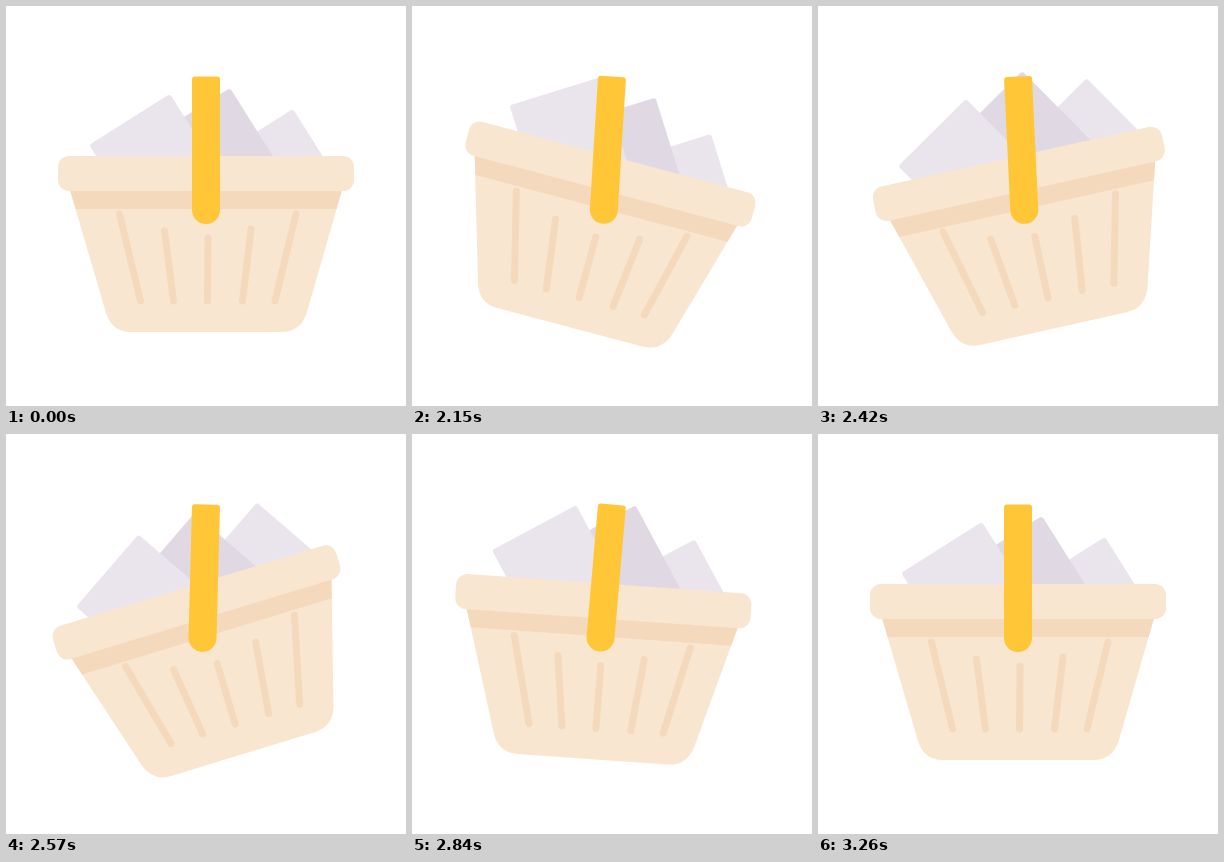
Recreate the animation shown at these times as an HTML page. Size 400 by 400 pixels, loop 3290 ms.

```html
<!DOCTYPE html>
<html lang="en">
<head>
<meta charset="utf-8">
<title>Swinging basket</title>
<style>
  html, body { margin: 0; width: 100%; height: 100%; overflow: hidden; background: #fff; }
  svg { display: block; width: 100%; height: 100%; }
</style>
</head>
<body>
<svg viewBox="0 0 400 400">
  <g id="basket">
    <g id="papers"></g>
    <path d="M64 184H336L301 306Q295 326 275 326H125Q106 326 100 307Z" fill="#f8e6d0"/>
    <path d="M64 184H336L330.6 203H69.7Z" fill="#f5d9bc"/>
    <path d="M113.5 208 134.5 295M158.5 225 167.5 295M202 232 201.5 295M245 223 236.5 295M290 208 269 295"
          stroke="#f5d9bc" stroke-width="7" stroke-linecap="round"/>
    <rect x="52" y="150" width="296" height="35" rx="11" fill="#f8e6d0"/>
  </g>
  <path id="handle" d="M186 73.5Q186 70.5 189 70.5H211Q214 70.5 214 73.5V204A14 14 0 0 1 186 204Z" fill="#ffc738"/>
</svg>
<script>
  const LOOP = 3290, REST = 2000, STEP = 30, BEAT = 8.3;
  const TOP = 71, PIVOT = 189.5;
  const byId = id => document.getElementById(id);

  // Turning points as [step, degrees]; the basket turns on an even beat, the handle leads it.
  const swing = [0, 22.8, -23.3, 8, -4.6, 0].map((angle, i) => [i * BEAT, angle]);
  const tilt = [[0, 0], [8.2, 5.3], [14, -2.7], [25.2, 7.3], [33, -0.7], [40.5, 0]];

  // Each paper hops twice: first step, length of a hop, and the two heights.
  const papers = [
    { x: 287, y: 103, height: 80, fill: '#eae5ed', delay: 8.2, hop: 16.4, lifts: [17.5, 10], drift: 0 },
    { x: 224, y: 82, height: 110, fill: '#e0d9e4', delay: 6.2, hop: 13.4, lifts: [15, 14.5], drift: 0.12 },
    { x: 164, y: 88, height: 90, fill: '#eae5ed', delay: 0, hop: 17, lifts: [18.5, 18], drift: 0.15 }
  ];

  for (const paper of papers) {
    paper.node = document.createElementNS('http://www.w3.org/2000/svg', 'rect');
    const attributes = { x: -95.5, width: 95.5, height: paper.height, rx: 3, fill: paper.fill };
    for (const name in attributes) paper.node.setAttribute(name, attributes[name]);
    byId('papers').append(paper.node);
  }

  function sample(keys, n) {
    const i = keys.findIndex(([step]) => n < step);
    if (i < 1) return 0;
    const [a, from] = keys[i - 1], [b, to] = keys[i];
    const u = (n - a) / (b - a);
    return from + (to - from) * u * u * (3 - 2 * u);
  }

  function liftOf({ delay, hop, lifts }, n) {
    const u = (n - delay) / hop;
    return (lifts[Math.floor(u)] || 0) * Math.sin(Math.PI * u) ** 2;
  }

  function draw(time) {
    const n = Math.max(0, Math.floor((time % LOOP - REST) / STEP));
    const angle = sample(tilt, n);
    const hang = `rotate(${angle} 200 ${TOP})`;
    byId('handle').setAttribute('transform', hang);
    byId('basket').setAttribute('transform', `${hang} rotate(${sample(swing, n) - angle} 200 ${PIVOT})`);
    for (const paper of papers) {
      const lift = liftOf(paper, n);
      paper.node.setAttribute('transform',
        `translate(${paper.x + paper.drift * lift} ${paper.y - lift}) rotate(-32.2)`);
    }
  }

  const start = performance.now();
  function tick() {
    draw(performance.now() - start);
    requestAnimationFrame(tick);
  }
  tick();
</script>
</body>
</html>
```
